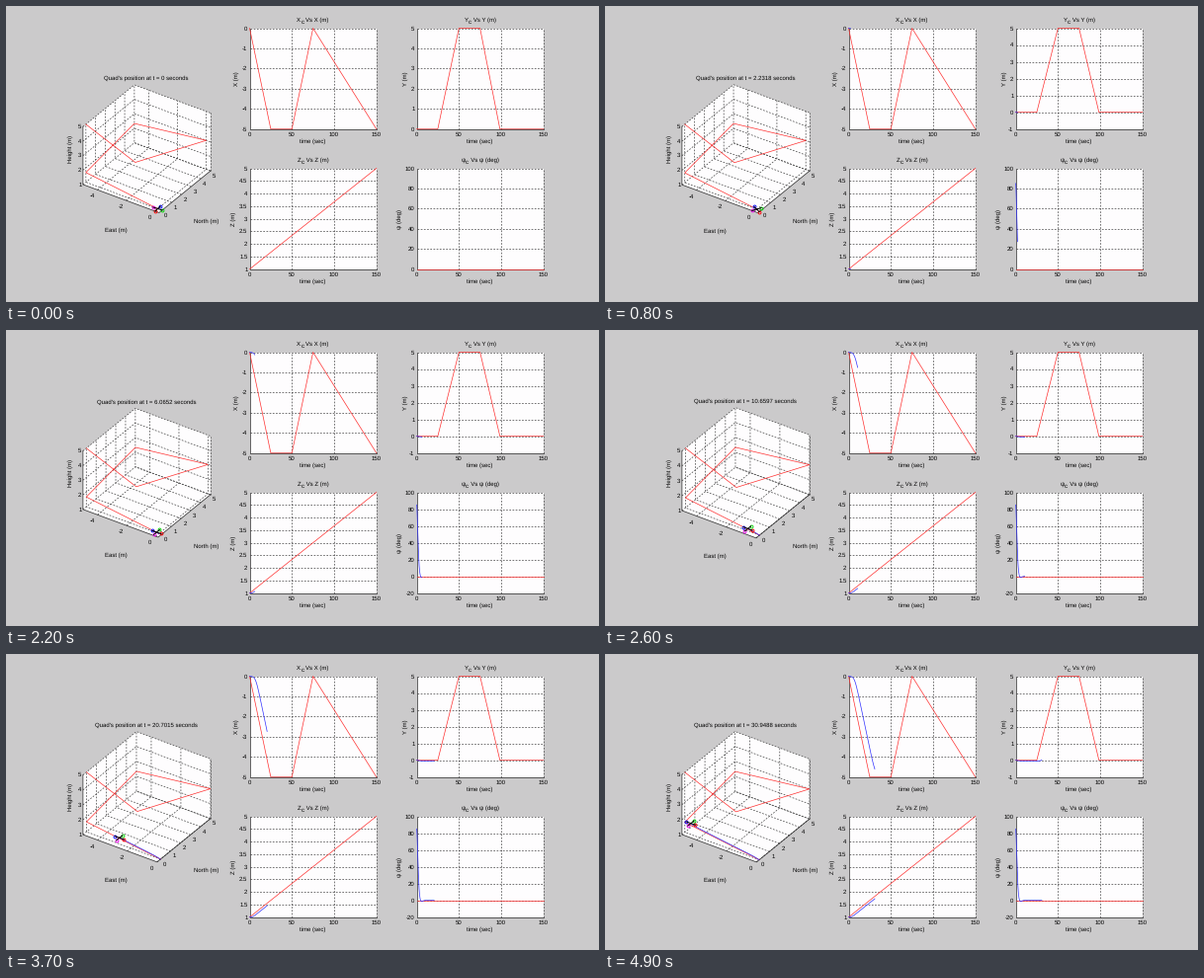
These frames come from a looping animation (600 px wide and 300 px high, 5 s). A matplotlib script:

```python
import numpy as np
import matplotlib.pyplot as plt
from matplotlib.animation import FuncAnimation

PX = 0.72  # points per pixel at 100 dpi
plt.rcParams.update({
    "font.family": "Liberation Sans",
    "font.size": 6.05 * PX,
    "text.hinting": "none",
    "lines.scale_dashes": False,
})

FRAMES = 50
HOLDS = (11, 15, 16, 44)  # frames that repeat the one before
ARM = 0.3
AZ, EL = np.radians(34), np.radians(33.3)
INK, GRID, RED, BLUE = "#262626", "#404040", "#ff3030", "#3030ff"

# commanded path over time
REF_T = np.array([0, 25, 50, 75, 98.5, 150])
REF_X = np.array([0, -5, -5, 0, -5 * 23.5 / 75, -5])
REF_Y = np.array([0, 0, 5, 5, 0, 0])
REF_Z = 1 + 4 * REF_T / 150

fig = plt.figure(figsize=(6, 3), dpi=100, facecolor="#cbcacb")
ax = fig.add_axes([0, 0, 1, 1])
ax.set_xlim(0, 600)
ax.set_ylim(300, 0)
ax.axis("off")
live = []


def line(x, y, color=INK, width=0.7, **kw):
    live.extend(ax.plot(x, y, color=color, lw=width * PX, **kw))


def dashed(x, y):
    line(x, y, GRID, dashes=(1.7 * PX, 1.5 * PX), dash_capstyle="butt")


def fill(points):
    live.extend(ax.fill(*zip(*points), color="#fefdfe", lw=0))


def text(x, y, s, ha="center", **kw):
    live.append(ax.text(x, y, s, ha=ha, va="center", color="black", **kw))


def ramp(t, width):
    """Smooth version of max(t, 0)."""
    return width * np.logaddexp(0, t / width)


def clock(frame):
    step = frame - sum(h <= frame for h in HOLDS)
    return np.interp(step, [0, 8, 14, 19, 28, 40, 45],
                     [0, 2.2318, 4.5326, 6.0652, 16.4029, 25, 30.9488])


def flight(t):
    x = -0.2 * (ramp(t - 7, 1.5) - ramp(t - 32, 2))
    y = -0.05 * t**2 / (t**2 + 9) + 0.2 * ramp(t - 33, 1.5)
    z = 1 + 0.02667 * (ramp(t - 3.6, 1.2) - ramp(-3.6, 1.2))
    a, b = 0.72, 0.54
    psi = 85 * np.exp(-a * t) * (np.cos(b * t) + a / b * np.sin(b * t))
    return x, y, z, psi


def chart(left, top, low, high, step, ref, times, values, name, unit, gap, sub):
    """One time plot with its grid, command line and response."""
    width, height = 128.3, 102.2
    right, bottom = left + width, top + height

    def px(t):
        return left + width * np.asarray(t) / 150

    def py(v):
        return bottom - height * (np.asarray(v) - low) / (high - low)

    fill([(left, top), (right, top), (right, bottom), (left, bottom)])
    for t in (0, 50, 100, 150):
        if t:
            dashed([px(t)] * 2, [bottom, top])
        text(px(t), bottom + 6, str(t))
    for v in np.arange(low, high + step / 2, step):
        if v > low:
            dashed([left, right], [py(v)] * 2)
        text(left - 2, py(v) + 0.4, f"{v:g}", ha="right")
    line([left, left, right], [top, bottom, bottom])
    line(px(REF_T), py(ref), RED)
    line(px(times), py(values), BLUE)
    mid = left + width / 2
    text(mid, top - 8.6, f"{name}   Vs {name} ({unit})")
    text(mid - sub, top - 5.7, "c")
    text(mid, bottom + 12.8, "time (sec)")
    text(left - gap, top + height / 2, f"{name} ({unit})", rotation=90)


def scene(t, times, path):
    """The 3D view; equal units on every axis, scaled to a fixed width."""
    x, y, z, psi = flight(t)
    a = np.radians(psi)
    reach = ARM * max(abs(np.cos(a)), abs(np.sin(a)))
    e0, e1 = min(-5, x - reach), max(0, x + reach)
    n0, n1 = min(0, y - reach), 5
    z0, z1 = 1, 5
    k = 129 / (np.cos(AZ) * (e1 - e0) + np.sin(AZ) * (n1 - n0))
    ce, cn, cz = (e0 + e1) / 2, (n0 + n1) / 2, (z0 + z1) / 2

    def project(e, n, h):
        e, n, h = np.asarray(e) - ce, np.asarray(n) - cn, np.asarray(h) - cz
        across = np.cos(AZ) * e + np.sin(AZ) * n
        depth = np.cos(AZ) * n - np.sin(AZ) * e
        return (142.4 + k * across,
                144.7 - k * (np.sin(EL) * depth + np.cos(EL) * h))

    def path3(*points):
        return project(*zip(*points))

    fill([project(*p) for p in ((e0, n0, z0), (e0, n0, z1), (e0, n1, z1),
                                (e1, n1, z1), (e1, n1, z0), (e1, n0, z0))])

    for e in (-4, -2, 0):
        dashed(*path3((e, n0, z0), (e, n1, z0), (e, n1, z1)))
        tx, ty = project(e, n0, z0)
        text(tx - 5.5, ty + 6.4, str(e))
    for n in range(6):
        dashed(*path3((e1, n, z0), (e0, n, z0), (e0, n, z1)))
        tx, ty = project(e1, n, z0)
        text(tx + 3.8, ty + 5, str(n))
    for h in range(1, 6):
        dashed(*path3((e0, n0, h), (e0, n1, h), (e1, n1, h)))
        tx, ty = project(e0, n0, h)
        text(tx - 1.5, ty + 0.2, str(h), ha="right")
    dashed(*path3((e1, n1, z0), (e1, n1, z1)))
    line(*path3((e0, n0, z1), (e0, n0, z0), (e1, n0, z0), (e1, n1, z0)))

    line(*project(REF_X, REF_Y, REF_Z), RED)
    line(*project(*path[:3]), BLUE)

    c, s = ARM * np.cos(a), ARM * np.sin(a)
    for de, dn, color in ((-c, s, "#0000ff"), (s, c, "#00d800"),
                          (-s, -c, "#f000f0"), (c, -s, "#ff0000")):
        line(*path3((x + de, y + dn, z)), color, marker="o", ms=2.9 * PX,
             mew=0.9 * PX, mfc="none")
    for de, dn in ((c, -s), (s, c)):
        line(*path3((x - de, y - dn, z), (x + de, y + dn, z)), "black", 1)

    top, bottom = project(e0, n1, z1)[1], project(e1, n0, z0)[1]
    text(142, top - 6.5, f"Quad's position at t = {round(float(t), 4):.7g} seconds")
    text(111, bottom + 18.2, "East (m)")
    text(202.7, bottom + 8.8, "North (m)")
    text(65.3, 144.8, "Height (m)", rotation=90)


def update(frame):
    while live:
        live.pop().remove()
    t = clock(frame)
    times = np.linspace(0, t, 150)
    path = flight(times)
    x, y, z, psi = path
    y_low = -1 if y.min() < -0.001 else 0
    psi_low = -20 if psi.min() < 0 else 0
    chart(246.5, 22.5, -5, 0, 1, REF_X, times, x, "X", "m", 13, 10.5)
    chart(415.5, 22.5, y_low, 5, 1, REF_Y, times, y, "Y", "m", 11.5, 10.5)
    chart(246.5, 164.5, 1, 5, 0.5, REF_Z, times, z, "Z", "m", 16, 10.5)
    chart(415.5, 164.5, psi_low, 100, 20, 0 * REF_T, times, psi,
          "ψ", "deg", 17, 13)
    scene(t, times, path)
    return live


anim = FuncAnimation(fig, update, frames=FRAMES, interval=100,
                     init_func=lambda: update(0), repeat=True, repeat_delay=0)
plt.show()
```
